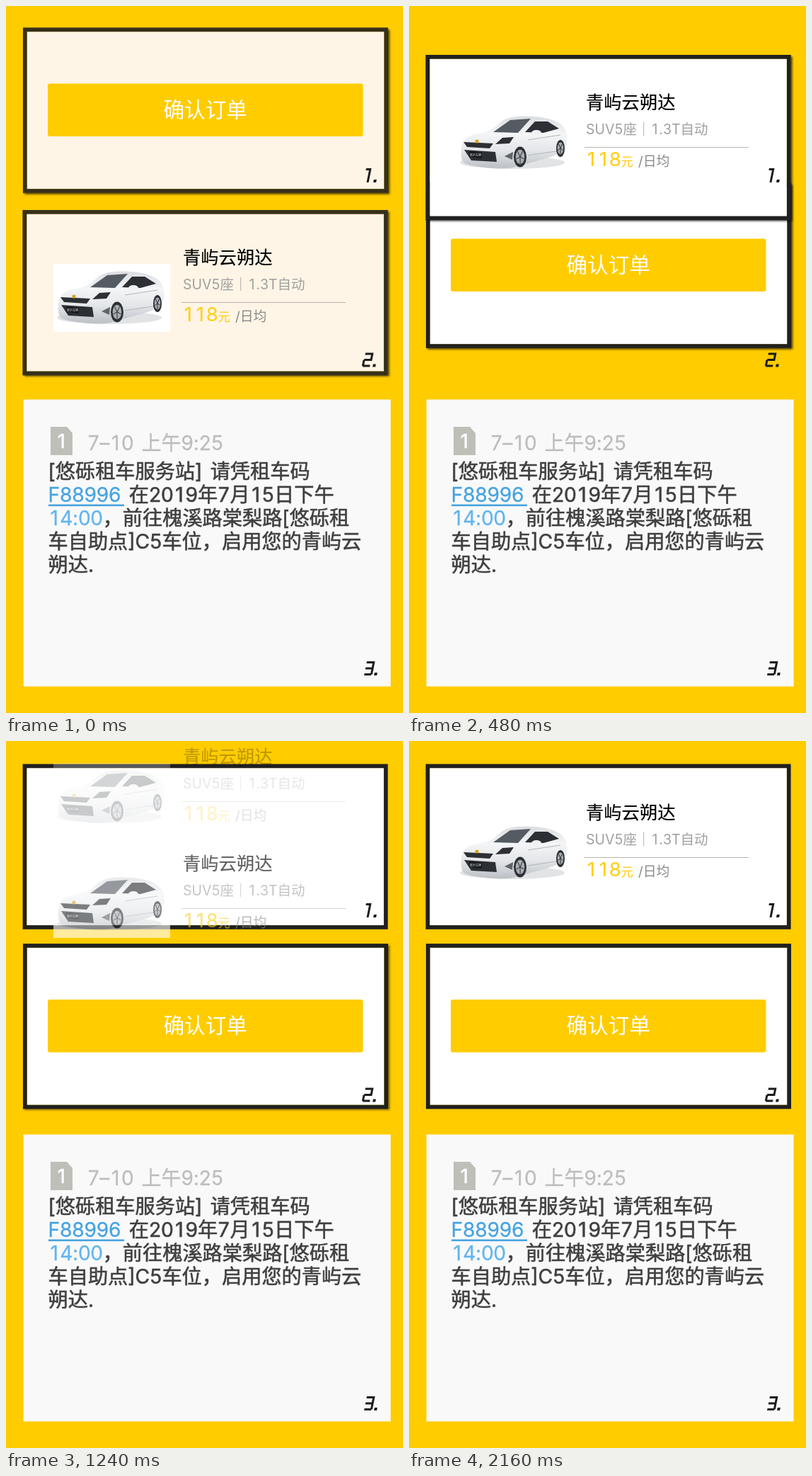
These frames come from a looping animation (561x998 px, 2.72 s). An HTML page with a canvas:

```html
<!DOCTYPE html>
<html lang="zh-CN">
<head>
<meta charset="utf-8">
<title>租车订单</title>
<style>
  html, body { margin: 0; width: 100%; height: 100%; overflow: hidden; background: #fc0; }
  canvas { display: block; }
</style>
</head>
<body>
<canvas id="stage" width="561" height="998"></canvas>
<script>
const W = 561, H = 998, LOOP = 2720, STEP = 40, SHIFT = 255.5, ROLL = 560;
const FONT = 'Inter, "Noto Sans CJK SC", "Noto Sans CJK", sans-serif';
const YELLOW = '#fc0', INK = '#202020', DARK = '#2c3035', GREY = '#a0a0a0';
const stage = document.getElementById('stage').getContext('2d');

const clamp = v => Math.max(0, Math.min(1, v));
const span = (t, a, b) => clamp((t - a) / (b - a));

function layer(h, paint) {
  const c = document.createElement('canvas');
  c.width = W;
  c.height = h;
  paint(c.getContext('2d'));
  return c;
}

// Equally wide digits and wide spaces; returns the end of the text
function text(g, str, x, y, size, color, heft = 0) {
  g.font = `400 ${size}px ${FONT}`;
  g.fillStyle = g.strokeStyle = color;
  g.lineWidth = heft;
  for (const run of str.match(/\d|\s|[^\d\s]+/g)) {
    const w = g.measureText(run).width;
    const cell = /\d/.test(run) ? size * 0.612 : /\s/.test(run) ? size * 0.4 : w;
    const left = x + (cell - w) / 2;
    g.fillText(run, left, y);
    if (heft) g.strokeText(run, left, y);
    x += cell;
  }
  return x;
}

function poly(g, color, ...p) {
  g.fillStyle = color;
  g.beginPath();
  for (let i = 0; i < p.length; i += 2) g.lineTo(p[i], p[i + 1]);
  g.fill();
}

// Closed smooth shape guided by a few corners
function blob(g, color, ...p) {
  const n = p.length;
  g.fillStyle = color;
  g.beginPath();
  for (let i = 0; i <= n; i += 2) {
    const [x, y, u, v] = [0, 1, 2, 3].map(k => p[(i + k) % n]);
    if (i) g.quadraticCurveTo(x, y, (x + u) / 2, (y + v) / 2);
    else g.moveTo((x + u) / 2, (y + v) / 2);
  }
  g.fill();
}

function oval(g, color, x, y, rx, ry) {
  g.fillStyle = color;
  g.beginPath();
  g.ellipse(x, y, rx, ry, 0, 0, 7);
  g.fill();
}

function wheel(g, x, y, rx, ry) {
  oval(g, DARK, x, y, rx, ry);
  oval(g, '#a9adb2', x, y, rx * 0.7, ry * 0.7);
  g.strokeStyle = DARK;
  g.beginPath();
  for (let a = 0.3; a < 6; a += Math.PI * 0.4) {
    g.moveTo(x, y);
    g.lineTo(x + Math.cos(a) * rx * 0.65, y + Math.sin(a) * ry * 0.65);
  }
  g.stroke();
}

function car(g) {
  g.fillStyle = '#fff';
  g.fillRect(67, 364, 165, 96);
  oval(g, '#e2e3e5', 146, 440, 74, 9);
  const paint = g.createLinearGradient(0, 376, 0, 446);
  ['#dcdee1', '#f4f5f6', '#e4e6e9', '#bfc3c8'].forEach((c, i) => paint.addColorStop(i / 3, c));
  blob(g, paint, 72, 438, 76, 402, 116, 397, 137, 374, 194, 375, 224, 390, 223, 426, 168, 441, 138, 450, 88, 445);
  poly(g, '#555b62', 119, 397, 143, 380, 172, 378, 154, 398);
  poly(g, DARK, 164, 397, 178, 382, 196, 382, 212, 392, 190, 398);
  poly(g, DARK, 77, 411, 119, 413, 114, 420, 82, 418);
  poly(g, DARK, 78, 422, 122, 425, 124, 439, 88, 437);
  poly(g, DARK, 122, 414, 132, 405, 148, 404, 142, 413);
  poly(g, '#60656b', 135, 431, 147, 425, 146, 436);
  oval(g, '#f0f1f3', 180, 398, 7, 4);
  g.strokeStyle = '#b2b6bb';
  g.lineWidth = 1;
  for (const y of [408, 430]) {
    g.beginPath();
    g.moveTo(168, y);
    g.lineTo(214, y - 7);
    g.stroke();
  }
  oval(g, '#d9a520', 96, 410, 2.6, 2.6);
  poly(g, '#17191c', 85, 424, 103, 426, 103, 434, 85, 432);
  text(g, '展示车辆', 86, 431, 4, '#ddd');
  wheel(g, 157, 432, 9, 14.5);
  wheel(g, 214, 420, 6, 12);
}

// Car details; the layer's top lies at 340
const offer = layer(130, g => {
  g.translate(0, -340);
  car(g);
  text(g, '青屿云朔达', 250, 364, 25.3, '#000', 0.2);
  text(g, 'SUV5座｜1.3T自动', 250, 400, 19.5, GREY);
  g.fillStyle = '#b8b6b2';
  g.fillRect(248, 418, 232, 1);
  const x = text(g, '118', 249, 445, 27.6, '#ffcf1c', 0.2);
  text(g, '元', x, 445, 17, '#ffcf1c', 0.2);
  text(g, '/日均', 324, 445, 18.8, '#8a8a8a');
});

// Slanted square numerals
function label(g, n, x, y) {
  const bend = n === 2 ? 1 : 11;
  g.save();
  g.transform(1, 0, -0.2, 1, x, y);
  g.strokeStyle = g.fillStyle = '#1c1c1c';
  g.lineWidth = 3;
  g.beginPath();
  g.moveTo(1, -18.5);
  if (n === 1) {
    g.lineTo(7, -18.5);
    g.lineTo(7, 0);
  } else {
    g.lineTo(11, -18.5);
    g.lineTo(11, -10);
    g.lineTo(1, -10);
    g.moveTo(bend, -10);
    g.lineTo(bend, -1.5);
    g.moveTo(1, -1.5);
    g.lineTo(11, -1.5);
  }
  g.stroke();
  g.fillRect(15, -4, 4, 4);
  g.restore();
}

const labels = layer(H, g => {
  label(g, 1, 504, 249);
  label(g, 2, 503, 509.5);
  label(g, 3, 505, 945);
});

const panel = layer(H, g => {
  g.fillStyle = '#f9f9f9';
  g.fillRect(24.6, 555.5, 519, 405);
  poly(g, '#bfbfb9', 63, 594, 86, 594, 94, 603, 94, 634, 63, 634);
  text(g, '1', 70, 624, 27, '#fff', 0.6);
  text(g, '7–10 上午9:25', 115, 627, 28, '#bdbdbd', 0.3);
});

const message = layer(H, g => {
  const lines = [
    '[悠砾租车服务站] 请凭租车码',
    'F88996 在2019年7月15日下午',
    '14:00，前往槐溪路棠梨路[悠砾租',
    '车自助点]C5车位，启用您的青屿云',
    '朔达.'
  ];
  const tints = { 'F88996': '#45a3e0', '14:00': '#62b5ee' };
  lines.forEach((line, row) => {
    let x = 59.5;
    for (const part of line.split(/(F88996|14:00)/).filter(Boolean))
      x = text(g, part, x, 667 + row * 33, 28.2, tints[part] || '#404040', tints[part] ? 0.3 : 0.6);
  });
  g.fillStyle = tints.F88996;
  g.fillRect(60, 703.5, 107, 2.6);
});

function put(img, y, alpha = 1) {
  if (alpha <= 0) return;
  stage.globalAlpha = alpha;
  stage.drawImage(img, 0, Math.round(y));
  stage.globalAlpha = 1;
}

function card(x, y, fade, shade) {
  const g = stage, w = 516, h = 233.3, b = 5.7;
  if (shade > 0) {
    g.save();
    g.beginPath();
    g.rect(0, 0, W, H);
    g.rect(x, y, w, h);
    g.clip('evenodd');
    g.shadowColor = `rgba(0,0,0,${0.75 * shade})`;
    g.shadowBlur = 3;
    g.shadowOffsetX = g.shadowOffsetY = 2;
    g.fillStyle = INK;
    g.fillRect(x, y, w, h);
    g.restore();
  }
  g.globalAlpha = 0.9 + 0.1 * fade;
  g.fillStyle = `rgb(255,${250 + 5 * fade},255)`;
  g.fillRect(x + b, y + b, w - 2 * b, h - 2 * b);
  g.strokeStyle = INK;
  g.lineWidth = b;
  g.strokeRect(x + b / 2, y + b / 2, w - b, h - b);
  g.globalAlpha = 1;
}

function button(y) {
  stage.fillStyle = YELLOW;
  stage.beginPath();
  stage.roundRect(59, y, 445.5, 74.5, 3);
  stage.fill();
  text(stage, '确认订单', 222.5, y + 47, 29.6, '#fff');
}

function draw(t) {
  stage.fillStyle = YELLOW;
  stage.fillRect(0, 0, W, H);

  // Cards trade places
  const move = SHIFT * span(t, 0, ROLL), fade = span(t, 0, 480);
  card(24, 30.6 + move, fade, 1 - span(t, 1120, 1120 + ROLL));
  button(109.6 + move);
  card(23.6, 288 - move, fade, (1 - span(t, 560, 560 + ROLL)) ** 2);

  // Car details roll over
  const top = 340 - move;
  if (t <= 1120) put(offer, top);
  else {
    const out = span(t, 1120, 1280), rest = (1 - span(t, 1120, 1120 + ROLL)) ** 4;
    put(offer, top - 104 * out, 1 - out);
    put(offer, top + 1 + 191 * rest, 1 - rest);
  }

  put(panel, 0);
  const rise = t < 1840 ? 1 : span(t, 1800, 2160);
  put(message, 23 * (1 - rise), rise);
  put(labels, 0);
}

const start = performance.now();
function tick() {
  const t = (performance.now() - start) % LOOP;
  draw(Math.floor(t / STEP) * STEP);
  requestAnimationFrame(tick);
}
tick();
</script>
</body>
</html>
```
